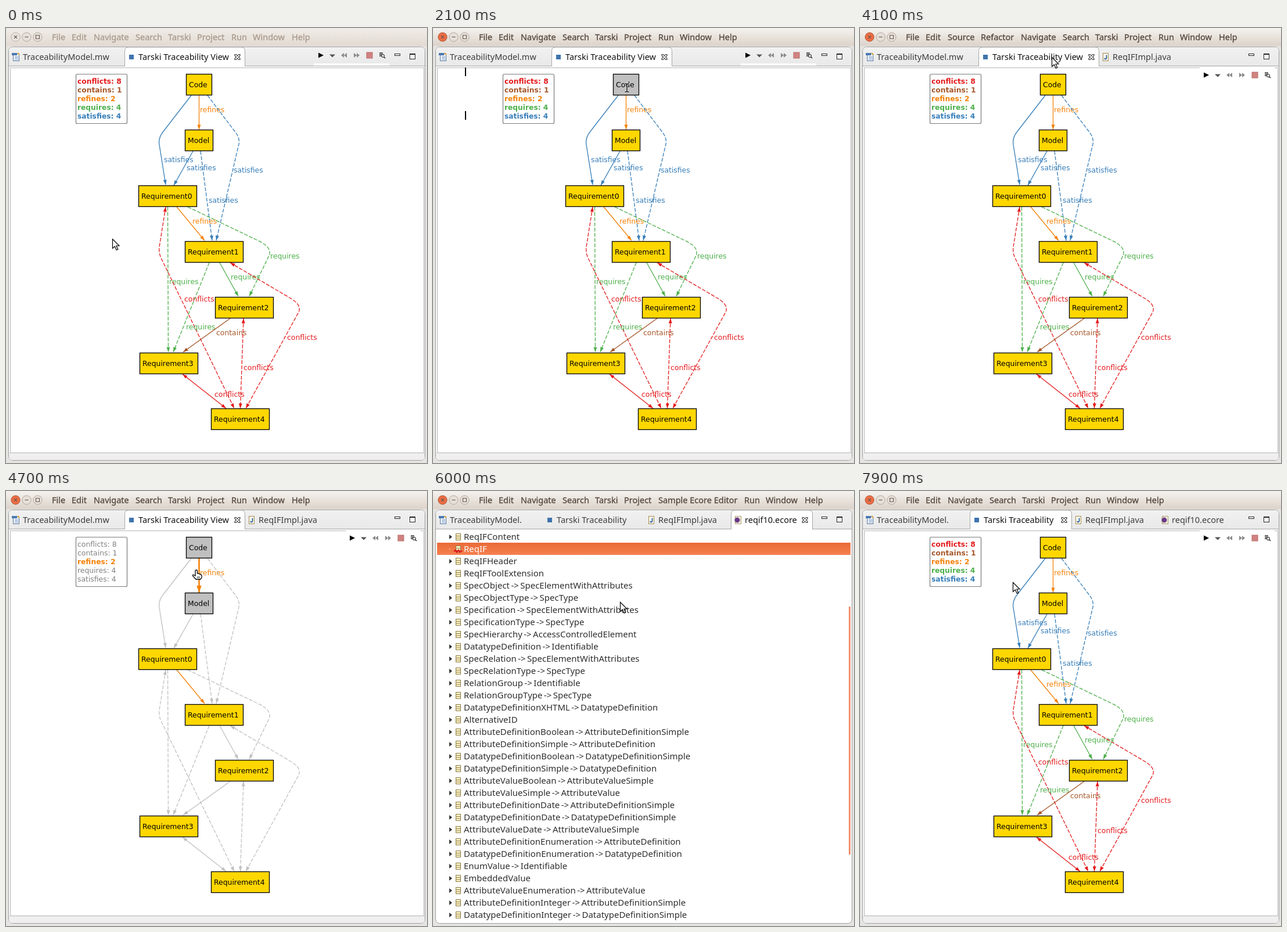
An HTML page that plays this animation: 725x749 px, repeating every 8 s.

```html
<!DOCTYPE html>
<html lang="en">
<head>
<meta charset="utf-8">
<title>Traceability view</title>
<style>
html, body { margin: 0; width: 100%; height: 100%; overflow: hidden; background: #e6e4e1; }
svg { display: block; width: 725px; height: 749px; }
.ui { font: 14.5px "Noto Sans", "Open Sans", sans-serif; fill: #3c3c3c; }
.tree { font-size: 15px; word-spacing: -1.5px; fill: #2e2e2e; }
#menus { stroke: currentColor; stroke-width: .3px; fill: currentColor; }
.graph { font: 12.4px "DejaVu Sans", sans-serif; }
.bold { font-weight: bold; font-size: 12.25px; }
pre { margin: 0; font: 13.29px/15px "DejaVu Sans Mono", monospace; color: #000; }
pre i { font-style: normal; }
.doc { color: #3f5fbf; }
.link { color: #3f3fbf; }
.html { color: #7f7f9f; }
.tag { color: #7f9fbf; font-weight: bold; }
.key { color: #7f0055; font-weight: bold; }
.field { color: #0000c0; }
pre .const { color: #0000c0; font-weight: bold; font-style: italic; }
.pick, .pick i { color: #fff; }
u { text-decoration: underline wavy #e8673c 1px; text-underline-offset: 2px; text-decoration-skip-ink: none; }
</style>
</head>
<body>
<svg id="stage" viewBox="0 0 725 749"></svg>
<script>
const COLORS = { conflicts: '#e41a1c', contains: '#a65628', refines: '#f5820a', requires: '#4daf4a', satisfies: '#377eb8' };
const COUNTS = { conflicts: 8, contains: 1, refines: 2, requires: 4, satisfies: 4 };
const GRAPH_ON = '0-2300 4100-5600 7200-8000';

const layer = (on, body) => `<g data-on="${on}">${body}</g>`;
const text = (x, y, s, extra = '') => `<text x="${x}" y="${y}" ${extra}>${s}</text>`;
const rect = (x, y, w, h, fill, extra = '') => `<rect x="${x}" y="${y}" width="${w}" height="${h}" fill="${fill}" ${extra}/>`;
const path = (d, fill, extra = '') => `<path d="${d}" fill="${fill}" ${extra}/>`;
const move = (x, y, body) => `<g transform="translate(${x} ${y})">${body}</g>`;
const esc = s => s.replace(/&/g, '&amp;').replace(/</g, '&lt;').replace(/>/g, '&gt;');

/* ---- window frame, menus and tabs ---- */
function button(x, mark, fill, stroke) {
  return move(x, 15.5, `<circle r="7.6" fill="${fill}" stroke="${stroke}"/>` + path(mark, 'none', 'stroke="#6b5d52" stroke-width="1.2"'));
}
const CROSS = 'M-2.5 -2.5L2.5 2.5M2.5 -2.5L-2.5 2.5';

function frame() {
  return rect(0, 0, 725, 749, '#e6e4e1') +
    layer('0-1600', rect(0, 0, 725, 31, 'url(#dim)') + button(16.5, CROSS, '#e9e4de', '#b9afa5')) +
    layer('1600-8000', rect(0, 0, 725, 31, 'url(#title)') + button(16.5, CROSS, '#ee6c43', '#a9502f')) +
    button(35.5, 'M-3 0H3', '#e6e0d9', '#b0a69b') +
    button(54.5, 'M-3 -3H3V3H-3Z', '#e6e0d9', '#b0a69b') +
    rect(4.5, 32.5, 717, 712, '#fff', 'rx="7" stroke="#9f9f9f"') +
    path('M5 65V40Q5 33 12 33H714Q721 33 721 40V65Z', 'url(#bar)') +
    path('M5 65.5H721', 'none', 'stroke="#a6a6a6"');
}

function menu(on, items) {
  return layer(on, items.split(',').map(i => {
    const [, name, x] = i.match(/(.+) (\d+)$/);
    return text(x, 21, name);
  }).join(''));
}
const HEAD = 'File 79,Edit 113,';
const BASE_MENU = HEAD + 'Navigate 151,Search 223,Tarski 279,Project 329,Run 388,Window 425,Help 492';
const JAVA_MENU = HEAD + 'Source 151,Refactor 208,Navigate 277,Search 349,Tarski 405,Project 455,Run 514,Window 551,Help 618';
const ECORE_MENU = HEAD + 'Navigate 151,Search 223,Tarski 279,Project 329,Sample Ecore Editor 388,Run 536,Window 573,Help 640';

const ecoreIcon = rect(-4.5, -6.5, 10, 13, '#fffbe8', 'stroke="#a59a6a"') +
  path('M-6 0L-1 -5L4 0L-1 5Z', '#7b3f98') + path('M-6 -2H4M-6 2H4M-3 -5V5M1 -5V5', 'none', 'stroke="#4d2668" stroke-width=".8"');
const ICONS = {
  model: rect(-4.5, -5.5, 10, 12, '#f4f8ff', 'stroke="#54749c"') + path('M-2 -1H4M-2 1.5H4M-2 4H4', 'none', 'stroke="#6f92c4"') +
    rect(-7, -7, 9, 4, '#4a78b0') + path('M3 -7L6 -4', 'none', 'stroke="#d8a02c" stroke-width="2"'),
  view: rect(-4, -4, 8, 8, '#3f74ad'),
  java: rect(-4.5, -6.5, 9, 13, '#fffdf2', 'stroke="#a08b4c"') + path('M1.5 -3.5V1.5Q1.5 3.5 -.5 3.5Q-2 3.5 -2 2', 'none', 'stroke="#2d5f9a" stroke-width="1.8"'),
  ecore: ecoreIcon
};
const closeMark = x => move(x, 50, path('M-4.5 -4.5H-2L0 -2L2 -4.5H4.5V-2.5L2 0L4.5 2.5V4.5H2L0 2L-2 4.5H-4.5V2.5L-2 0L-4.5 -2.5Z', '#fff', 'stroke="#333" stroke-width="1.1"'));

function tabShape(x0, x1, active) {
  const d = `M${x0 + .5} 65V39.5Q${x0 + .5} 33 ${x0 + 7} 33H${x1 - 7}Q${x1 - .5} 33 ${x1 - .5} 39.5V65`;
  return path(d, '#fff', 'stroke="#a6a6a6"') + (active ? rect(x0 + 1, 64, x1 - x0 - 2, 3, '#fff') : '') + closeMark(x1 - 13.5);
}
function tabs(on, labels, active, hover) {
  return layer(on, tabShape(...active, true) + (hover ? layer(hover[0], tabShape(hover[1], hover[2])) : '') +
    labels.map(([icon, x, name]) => move(x - 12, 50, ICONS[icon]) + text(x, 55, name, x > active[0] && x < active[1] ? 'fill="#111"' : '')).join(''));
}
const WIDE = [['model', 29, 'TraceabilityModel.mw'], ['view', 228, 'Tarski Traceability View']];
const JAVA = ['java', 435, 'ReqIFImpl.java'];
const NARROW = [['model', 29, 'TraceabilityModel.'], ['view', 213, 'Tarski Traceability'], ['java', 388, 'ReqIFImpl.java'], ['ecore', 537, 'reqif10.ecore']];

const double = (x, s) => path(`M${x} 0l${5 * s} -4v8zM${x + 5 * s} 0l${5 * s} -4v8z`, '#8a8a8a');
const toolbar = path('M-4 -4.5L5 0L-4 4.5Z', '#000') + path('M15 -1.5H25L20 3.5Z', '#555') + double(35, 1) + double(67, -1) +
  rect(79, -5, 10, 10, '#d08280', 'stroke="#b86c6a"') +
  path('M101 -4H107M101 -1.5H107M101 1H105', 'none', 'stroke="#333" stroke-width="1.5"') +
  `<circle cx="107" cy="1" r="2.6" fill="#ddd" stroke="#222"/>` + path('M109 3L111 5', 'none', 'stroke="#222" stroke-width="1.6"');

function chrome() {
  return frame() +
    `<g class="ui"><g id="menus">` + menu('0-2400 4300-5800 7300-8000', BASE_MENU) + menu('2400-4300', JAVA_MENU) + menu('5800-7300', ECORE_MENU) + '</g>' +
    tabs('0-2300', WIDE, [204, 412]) +
    tabs('2300-4100', [...WIDE, JAVA], [411, 561], ['3700-4100', 204, 412]) +
    tabs('4100-5600', [...WIDE, JAVA], [204, 412]) +
    tabs('5600-7200', NARROW, [513, 654], ['6800-7200', 189, 364]) +
    tabs('7200-8000', NARROW, [189, 365]) + '</g>' +
    rect(669.5, 44.5, 9, 3, '#fff', 'stroke="#222"') + rect(695.5, 44.5, 9, 9, '#fff', 'stroke="#222"') + rect(695, 44, 10, 2, '#222');
}

/* ---- graph ---- */
const NODES = [['Code', 310, 79, 44], ['Model', 308, 175, 48], ['Requirement0', 228, 271, 100], ['Requirement1', 308, 367, 100],
  ['Requirement2', 360, 463, 100], ['Requirement3', 230, 559, 100], ['Requirement4', 353, 655, 100]];
// kind, style (d: dashed, b: arrow at both ends), path
const EDGES = [
  ['satisfies', '', 'M319 116L271 178Q261 190 264.5 204L275 270'],
  ['refines', '', 'M332.5 116L332.5 175'],
  ['satisfies', 'd', 'M347 116L394 178Q404 190 400.5 202L362 366'],
  ['satisfies', '', 'M322 212L289 271'],
  ['satisfies', 'd', 'M335 212L355 366'],
  ['refines', '', 'M294 308L342 366'],
  ['requires', 'd', 'M313 308L432 365Q461 378 452 394L419 462'],
  ['requires', 'd', 'M278.5 308L279.5 558'],
  ['conflicts', 'db', 'M275 308L264.5 374Q262 387 268 398L393 655'],
  ['requires', 'd', 'M350 404L288 558'],
  ['requires', '', 'M368 404L400 462'],
  ['conflicts', 'db', 'M386 404L486 463Q512 477 503 491L413 655'],
  ['conflicts', 'db', 'M409 500L403.5 655'],
  ['contains', '', 'M386 500L305 558'],
  ['conflicts', 'b', 'M304 596L379 655']
];
const LABELS = '272,231 334,145 392,249 311,245 349,301 321,337 455,397 281,441 307,471 310,519 387,433 484,537 409,589 362,529 359,635'.split(' ');

function arrow([x, y], [fx, fy]) {
  const a = Math.atan2(y - fy, x - fx) * 180 / Math.PI;
  return `<path class="tip" data-at="translate(${x} ${y}) rotate(${a})" d="M0 0L-8.5 -3V3Z" fill="currentColor"/>`;
}
function edge([kind, style, d], i) {
  const n = d.match(/[\d.]+/g).map(Number);
  const pts = n.filter((_, k) => k % 2 === 0).map((x, k) => [x, n[2 * k + 1]]);
  const dash = style.includes('d') ? 'stroke-dasharray="6.5 2.5"' : '';
  const [x, y] = LABELS[i].split(',');
  return `<g class="edge">` + path(d, 'none', `class="line" stroke="currentColor" ${dash}`) +
    arrow(pts.at(-1), pts.at(-2)) + (style.includes('b') ? arrow(pts[0], pts[1]) : '') +
    text(x, y, kind, 'fill="currentColor"') + '</g>';
}
function graph() {
  const box = rect(7.5, 68.5, 712, 663, '#fff', 'stroke="#b4b4b4"');
  const legend = rect(120.5, 79.5, 88, 85, '#fff', 'rx="2" stroke="#7c7c7c" stroke-width="1.2"') +
    Object.keys(COLORS).map((k, i) => text(123, 96 + 15 * i, `${k}: ${COUNTS[k]}`, 'class="key-line"')).join('');
  const nodes = NODES.map(([name, x, y, w]) =>
    rect(x + .5, y + .5, w, 36, '#ffd700', 'class="node" stroke="#000" stroke-width="1.3"') + text(x + 5, y + 23, name)).join('');
  return layer(GRAPH_ON, path('M5 731H721V738Q721 744 714 744H12Q5 744 5 738Z', '#efefef') + box +
    layer('0-2300', rect(530, 61, 130, 4, '#fff') + move(542, 47, toolbar)) +
    layer('4100-5600 7200-8000', rect(585, 67, 129, 3, '#fff') + move(596, 81, toolbar)) +
    `<g class="graph">${legend}${EDGES.map(edge).join('')}${nodes}</g>` +
    layer('2100-2300', rect(55, 68, 2, 15, '#000') + rect(55, 143, 2, 15, '#000')));
}

/* ---- Java editor ---- */
const attr = (what, name) => `    /**\n     * The ${what} value of the '{@link #${name}`;
const REST = "() <em>~Lang~</em>}' attribute. <!-- begin-user-doc\n     * -->\n     *\n     * @see #getLang()\n     * @generated\n     * @ordered\n     */\n";
const feature = (getter, name) => ` * <li>{@link org.eclipse.rmf.reqif10.impl.ReqIFImpl#${getter} <em>${name}</em>}</li>\n`;
const SOURCE = "/**\n * <!-- begin-user-doc --> An implementation of the model object '<em><b>~Req~ IF</b></em>'.\n" +
  ' * <p>\n * The following features are implemented:\n * <ul>\n' +
  feature('getLang', '~Lang~') + feature('getTheHeader', 'The Header') + feature('getCoreContent', 'Core Content') + feature('getToolExtensions', 'Tool Extensions') +
  ' * </ul>\n * </p>\n *\n * @generated\n */\npublic class ReqIFImpl extends MinimalEObjectImpl implements ReqIF {\n' +
  attr('default', 'getLang') + REST + '    protected static final String LANG_EDEFAULT = null;\n\n' +
  attr('cached', 'getLang') + REST + '    protected String lang = LANG_EDEFAULT;\n\n' +
  '    /**\n     * This is true if the ~Lang~ attribute has been set. <!-- begin-user-doc --> <!--\n     *\n     * @generated\n     * @ordered\n     */\n' +
  '    protected boolean langESet;\n\n' + attr('cached', 'getTheHeader') + "() <em>The Header</em>}' containment";

function paint(s, rule, names) {
  let out = '', last = 0;
  for (const m of s.matchAll(rule)) {
    out += esc(s.slice(last, m.index)) + `<i class="${names[m.slice(1).findIndex(Boolean)]}">${esc(m[0])}</i>`;
    last = m.index + m[0].length;
  }
  return (out + esc(s.slice(last))).replace(/~(.*?)~/g, '<u>$1</u>');
}
function codeLine(s) {
  if (/^\s*(\*|\/\*)/.test(s))
    return `<span class="doc">${paint(s, /(\{@link[^}]*\})|(<[^>]*>?|-->)|(@\w+)/g, ['link', 'html', 'tag'])}</span>`;
  const html = paint(s, /\b(public|class|extends|implements|protected|static|final|null|boolean)\b|\b(LANG_EDEFAULT)\b|\b(lang\w*)/g, ['key', 'const', 'field']);
  return s.startsWith('public') ? `<span data-pick>${html.slice(0, -2)}</span> {` : html;
}
function editor() {
  const lines = SOURCE.split('\n');
  const numbers = lines.map((s, i) => {
    const fold = s.trim() === '/**' ? `<circle cx="47.5" cy="${75.5 + 15 * i}" r="3.8" fill="#fff" stroke="#a9bccb"/>` + path(`M45.5 ${75.5 + 15 * i}h4`, 'none', 'stroke="#6f8aa0"') : '';
    return text(27, 80 + 15 * i, 31 + i) + fold;
  }).join('');
  return layer('2300-4100', rect(7, 68, 712, 674, '#fff') + rect(7, 68, 12, 674, 'url(#hatch)') +
    layer('2400-4100', `<g clip-path="url(#page)"><g fill="#787878" style="font:13.29px 'DejaVu Sans Mono',monospace">${numbers}</g>` +
      rect(55, 278, 651, 15, '#e8f2fe') +
      layer('2600-4100', rect(55.5, 278.5, 528, 14, '#f07746', 'stroke="#e02010"') + rect(583, 278, 2, 15, '#000') +
        path('M7 286l2-2 2 3 2-3 2 3 2-3 2 2', 'none', 'stroke="#e01818" stroke-width="1.8"') +
        rect(708.5, 88.5, 8, 4, '#fbb', 'stroke="#e04040"')) +
      `<foreignObject x="55" y="68" width="651" height="674"><pre>${lines.map(codeLine).join('\n')}</pre></foreignObject>` +
      rect(703, 74, 3, 54, '#f5906c') + '</g>') +
    layer('2700-3500', rect(53, 739, 445, 3, '#f5906c', 'opacity=".25"')));
}

/* ---- model tree ---- */
const TREE = ('ReqIFContent,ReqIF,ReqIFHeader,ReqIFToolExtension,SpecObject>SpecElementWithAttributes,SpecObjectType>SpecType,' +
  'Specification>SpecElementWithAttributes,SpecificationType>SpecType,SpecHierarchy>AccessControlledElement,DatatypeDefinition>Identifiable,' +
  'SpecRelation>SpecElementWithAttributes,SpecRelationType>SpecType,RelationGroup>Identifiable,RelationGroupType>SpecType,' +
  'DatatypeDefinitionXHTML>DatatypeDefinition,AlternativeID,AttributeDefinitionBoolean>AttributeDefinitionSimple,' +
  'AttributeDefinitionSimple>AttributeDefinition,DatatypeDefinitionBoolean>DatatypeDefinitionSimple,DatatypeDefinitionSimple>DatatypeDefinition,' +
  'AttributeValueBoolean>AttributeValueSimple,AttributeValueSimple>AttributeValue,AttributeDefinitionDate>AttributeDefinitionSimple,' +
  'DatatypeDefinitionDate>DatatypeDefinitionSimple,AttributeValueDate>AttributeValueSimple,AttributeDefinitionEnumeration>AttributeDefinition,' +
  'DatatypeDefinitionEnumeration>DatatypeDefinition,EnumValue>Identifiable,EmbeddedValue,AttributeValueEnumeration>AttributeValue,' +
  'AttributeDefinitionInteger>AttributeDefinitionSimple,DatatypeDefinitionInteger>DatatypeDefinitionSimple').split(',');
function tree() {
  const classIcon = rect(39.5, -5.5, 8, 11, '#fdf3c4', 'stroke="#8c7a48"') + path('M40 -1.5H47M40 2H47', 'none', 'stroke="#8c7a48"');
  const row = (s, i) => move(0, 79 + 21 * i, path('M28 -4L33 0L28 4Z', '#333') + classIcon + text(53, 5, esc(s.replace('>', ' -> '))));
  const picked = rect(7, 89, 712, 21, 'url(#pick)') + move(0, 100, path('M28 -2L30 0L28 2Z', '#f9b498') + classIcon +
    path('M36 4l3-2 2 3 3-3 2 3 4-2', 'none', 'stroke="#e01818" stroke-width="2.5"') + text(53, 5, 'ReqIF', 'fill="#fff"'));
  return layer('5600-7200', rect(7, 68, 712, 674, '#fff')) + `<g class="ui tree">` +
    layer('5700-5800', rect(7, 68, 712, 21, 'url(#pick)') + path('M11 77L13 78.5L11 80Z', '#fff') + move(25, 78.5, ecoreIcon) +
      text(35, 84, 'platform:/resource/eu.modelwriter.demonstration.requirements/reqif10.ecore', 'fill="#fff" font-size="14.7"')) +
    layer('5800-7200', TREE.map(row).join('') + rect(716, 199, 3, 427, '#f5906c')) + layer('6000-7200', picked) + '</g>';
}

/* ---- pointer ---- */
const POINTERS = {
  arrow: path('M.5 .5V16.5L4.3 13L7.2 19.3L9.8 18.2L7 12H12Z', '#fff', 'stroke="#000" stroke-width="1.2"'),
  hand: path('M-2 8V0Q-2 -2 -.3 -2Q1.5 -2 1.5 0V4Q4.5 3.5 5 5Q7.5 5 8 6.5Q9 6.5 9 8V11L7 14H-1L-6.5 8Q-6.5 5.5 -4.5 6.5Z', '#fff', 'stroke="#000" stroke-width="1.3"') +
    path('M2 9V12M4.5 9V12', 'none', 'stroke="#000"'),
  beam: path('M-4 -8H-1L0 -7L1 -8H4V-6H1V6H4V8H1L0 7L-1 8H-4V6H-1V-6H-4Z', '#000', 'stroke="#fff" stroke-width=".6"')
};
const ROUTE = [[0, 183, 363], [300, 183, 363], [1200, 334, 103], [3300, 334, 103], [3400, 337, 79], [3900, 330, 50], [4200, 330, 50],
  [4700, 328, 138], [5000, 322, 191], [6100, 322, 191], [6900, 292, 48], [7600, 292, 48], [7900, 263, 157], [8000, 263, 157]];
// start, end, hovered edge (-1: none), highlighted nodes
const HOVERS = [[800, 900, 0, [0, 2]], [1100, 2300, -1, [0]], [4400, 4600, -1, [0]], [4600, 4900, 1, [0, 1]], [4900, 5600, -1, [1]]];

const shade = (id, a, b) => `<linearGradient id="${id}" x2="0" y2="1"><stop stop-color="${a}"/><stop offset="1" stop-color="${b}"/></linearGradient>`;
const stage = document.getElementById('stage');
stage.innerHTML = '<defs>' + shade('dim', '#f0ece7', '#e2dad2') + shade('title', '#f5f2ee', '#dcd3ca') + shade('bar', '#f1f1f1', '#e9e9e9') + shade('pick', '#ea6a38', '#f5804f') +
  `<pattern id="hatch" width="2" height="2" patternUnits="userSpaceOnUse">${rect(0, 0, 2, 2, '#e6e6e6') + rect(0, 0, 1, 1, '#8c8c8c') + rect(1, 1, 1, 1, '#8c8c8c')}</pattern>` +
  `<clipPath id="page">${rect(7, 68, 712, 674, '#000')}</clipPath></defs>` +
  chrome() + graph() + editor() + tree() +
  '<g id="pointer">' + Object.keys(POINTERS).map(k => `<g data-kind="${k}">${POINTERS[k]}</g>`).join('') + '</g>';

const all = (q, root = stage) => [...root.querySelectorAll(q)];
const layers = all('[data-on]').map(el => [el, el.dataset.on.split(' ').map(r => r.split('-').map(Number))]);
const edges = all('.edge'), nodes = all('.node'), keys = all('.key-line'), kinds = all('[data-kind]');
const menus = stage.querySelector('#menus'), pointer = stage.querySelector('#pointer'), pick = stage.querySelector('[data-pick]');

function drawGraph(hot, lit) {
  const kind = hot < 0 ? '' : EDGES[hot][0];
  edges.forEach((el, i) => {
    const own = EDGES[i][0], on = i === hot;
    el.style.color = !kind || own === kind ? COLORS[own] : '#c0c0c0';
    el.querySelector('.line').setAttribute('stroke-width', on ? 2.6 : 1.3);
    all('.tip', el).forEach(tip => tip.setAttribute('transform', tip.dataset.at + (on ? ' scale(1.4)' : '')));
    el.querySelector('text').style.display = !kind || on ? '' : 'none';
  });
  nodes.forEach((el, i) => el.setAttribute('fill', lit.includes(i) ? '#c0c0c0' : '#ffd700'));
  Object.keys(COLORS).forEach((k, i) => {
    const strong = !kind || k === kind;
    keys[i].classList.toggle('bold', strong);
    keys[i].setAttribute('fill', strong ? COLORS[k] : '#808080');
  });
}

function draw(t) {
  layers.forEach(([el, spans]) => el.style.display = spans.some(([a, b]) => t >= a && t < b) ? '' : 'none');
  menus.style.color = t < 1600 ? '#a99a8c' : '#54473c';
  pick.classList.toggle('pick', t >= 2600);
  const hover = HOVERS.find(([a, b]) => t >= a && t < b);
  drawGraph(hover ? hover[2] : -1, hover ? hover[3] : []);

  const n = ROUTE.findIndex(k => k[0] > t), [t0, x0, y0] = ROUTE[n - 1], [t1, x1, y1] = ROUTE[n];
  const u = (t - t0) / (t1 - t0), s = u * u * (3 - 2 * u);
  pointer.setAttribute('transform', `translate(${Math.round(x0 + (x1 - x0) * s)} ${Math.round(y0 + (y1 - y0) * s)})`);
  const kind = t >= 2100 && t < 3700 ? 'beam' : hover ? 'hand' : 'arrow';
  kinds.forEach(el => el.style.display = el.dataset.kind === kind ? '' : 'none');
}

let shown = -1;
function tick() {
  const t = Math.floor(performance.now() % 8000 / 100) * 100;
  if (t !== shown) draw(shown = t);
  requestAnimationFrame(tick);
}
tick();
</script>
</body>
</html>
```
